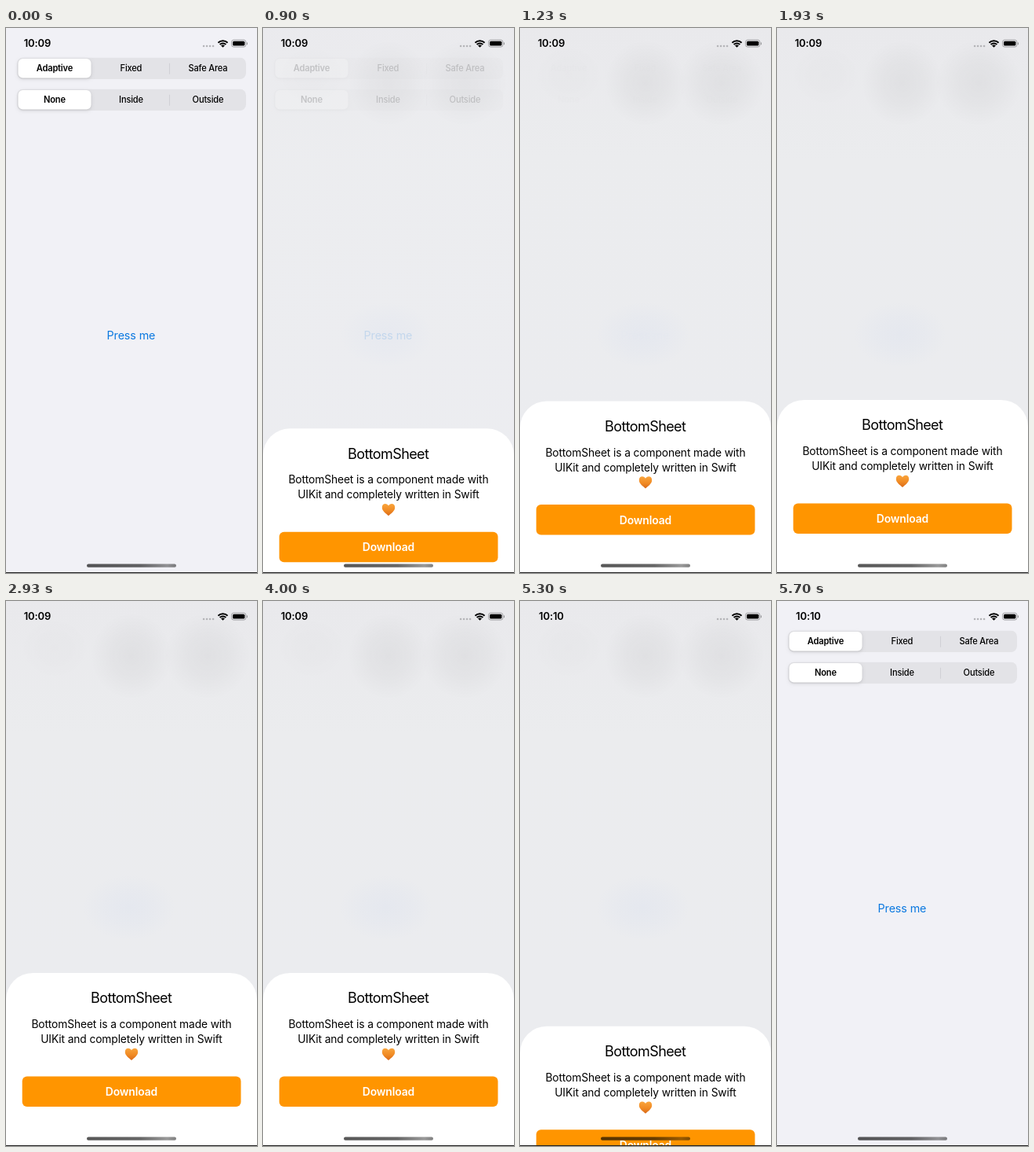
Write an HTML page with a canvas that moves like this. It is 320 px wide and 693 px high and loops after 5.77 s.

```html
<!DOCTYPE html>
<html lang="en">
<head>
<meta charset="utf-8">
<title>Bottom sheet</title>
<style>
html, body { margin: 0; width: 100%; height: 100%; overflow: hidden; background: #f1f1f6; }
canvas { display: block; width: 320px; height: 693px; }
</style>
</head>
<body>
<canvas id="stage"></canvas>
<script>
const W = 320, H = 693, LOOP = 5770;
const SHEET_TOP = 473, SHEET_H = H - SHEET_TOP;
const OPEN = 620, DRAG = 5057, RELEASE = 5300, GONE = 5640, MINUTE = 4500;

const canvas = document.getElementById('stage');
const ctx = canvas.getContext('2d');
const dpr = window.devicePixelRatio || 1;
canvas.width = Math.round(W * dpr);
canvas.height = Math.round(H * dpr);

const clamp = v => Math.max(0, Math.min(1, v));
const smooth = v => { v = clamp(v); return v * v * (3 - 2 * v); };

function text(str, x, y, size, weight, spacing, color) {
  ctx.font = `${weight} ${size}px Inter, Roboto, sans-serif`;
  ctx.letterSpacing = spacing + 'px';
  ctx.textAlign = 'center';
  ctx.fillStyle = color;
  ctx.fillText(str, x + spacing / 2, y);
}

function box(x, y, w, h, r, color) {
  ctx.beginPath();
  ctx.roundRect(x, y, w, h, r);
  ctx.fillStyle = color;
  ctx.fill();
}

function segments(y, labels) {
  box(14, y, 292, 27.3, 7.5, '#e3e3e7');
  ctx.save();
  ctx.shadowColor = 'rgba(0,0,0,.14)';
  ctx.shadowBlur = 4 * dpr;
  ctx.shadowOffsetY = 1.5 * dpr;
  box(15.5, y + 1.4, 93, 24.4, 6, '#fff');
  ctx.restore();
  box(208, y + 7, 1, 14, 0, '#d0d0d5');
  labels.forEach((s, i) =>
    text(s, [62, 159.5, 257.5][i], y + 17.4, 11.1, i ? 500 : 600, -0.2, '#000'));
}

function page(t) {
  ctx.fillStyle = '#f1f1f6';
  ctx.fillRect(0, 0, W, H);
  segments(37.7, ['Adaptive', 'Fixed', 'Safe Area']);
  segments(77.7, ['None', 'Inside', 'Outside']);
  const pressed = t >= 430 && t < 850;
  ctx.globalAlpha = pressed ? 0.25 + 0.75 * smooth((t - 600) / 250) : 1;
  text('Press me', 159.5, 396, 14.3, 400, -0.1, '#0a78e0');
  ctx.globalAlpha = 1;
}

function glow(x, y, rx, ry, rgb, alpha) {
  ctx.save();
  ctx.translate(x, y);
  ctx.scale(rx, ry);
  const g = ctx.createRadialGradient(0, 0, 0, 0, 0, 1);
  g.addColorStop(0, `rgba(${rgb},${alpha})`);
  g.addColorStop(0.5, `rgba(${rgb},${alpha * 0.6})`);
  g.addColorStop(1, `rgba(${rgb},0)`);
  ctx.fillStyle = g;
  ctx.fillRect(-1, -1, 2, 2);
  ctx.restore();
}

function backdrop(alpha) {
  if (alpha <= 0) return;
  ctx.globalAlpha = alpha;
  const g = ctx.createLinearGradient(0, 0, 0, 480);
  g.addColorStop(0, '#e9e9ec');
  g.addColorStop(0.35, '#ebecee');
  g.addColorStop(1, '#ebecef');
  ctx.fillStyle = g;
  ctx.fillRect(0, 0, W, H);
  glow(62, 60, 45, 40, '0,0,0', 0.012);
  glow(160, 70, 52, 55, '0,0,0', 0.045);
  glow(257, 70, 55, 55, '0,0,0', 0.045);
  glow(157, 390, 60, 42, '80,130,240', 0.04);
  ctx.globalAlpha = 1;
}

function heart(x, y) {
  ctx.save();
  ctx.translate(x, y);
  ctx.beginPath();
  ctx.moveTo(0, -4.8);
  ctx.bezierCurveTo(-1.6, -8.2, -8.2, -8.6, -8.2, -2.6);
  ctx.bezierCurveTo(-8.2, 2, -3, 5, 0, 8);
  ctx.bezierCurveTo(3, 5, 8.2, 2, 8.2, -2.6);
  ctx.bezierCurveTo(8.2, -8.6, 1.6, -8.2, 0, -4.8);
  const g = ctx.createLinearGradient(0, -7, 0, 8);
  g.addColorStop(0, '#f9a43c');
  g.addColorStop(0.55, '#f08a24');
  g.addColorStop(1, '#d9691a');
  ctx.fillStyle = g;
  ctx.fill();
  ctx.restore();
}

function sheet(top) {
  if (top >= H) return;
  ctx.save();
  ctx.translate(0, top);
  box(0, 0, W, H, [34, 34, 0, 0], '#fff');
  text('BottomSheet', 160, 38.3, 18, 400, -0.6, '#000');
  text('BottomSheet is a component made with', 160, 70, 13.8, 400, -0.12, '#000');
  text('UIKit and completely written in Swift', 160, 89, 13.8, 400, -0.12, '#000');
  heart(160, 103);
  box(20.7, 131.5, 278.8, 38.5, 6, '#ff9500');
  text('Download', 160, 156, 13.9, 600, -0.15, '#fff');
  ctx.restore();
}

function statusBar(t) {
  text(t < MINUTE ? '10:09' : '10:10', 40, 24.3, 13, 600, -0.1, '#000');
  for (let i = 0; i < 4; i++) box(250.8 + i * 4, 21.7, 2.6, 2.6, 1.3, '#b4b4b8');

  ctx.save();
  ctx.beginPath();
  ctx.moveTo(276.5, 24.8);
  ctx.arc(276.5, 24.8, 10, -Math.PI * 0.75, -Math.PI * 0.25);
  ctx.closePath();
  ctx.clip();
  ctx.strokeStyle = ctx.fillStyle = '#000';
  ctx.lineWidth = 2;
  for (const r of [8.6, 5.4]) {
    ctx.beginPath();
    ctx.arc(276.5, 24.8, r, 0, Math.PI * 2);
    ctx.stroke();
  }
  ctx.beginPath();
  ctx.arc(276.5, 24.8, 3.2, 0, Math.PI * 2);
  ctx.fill();
  ctx.restore();

  ctx.beginPath();
  ctx.roundRect(287.5, 15.2, 18.4, 8.9, 2.8);
  ctx.strokeStyle = '#9a9a9d';
  ctx.lineWidth = 0.9;
  ctx.stroke();
  box(289, 16.7, 15.4, 5.9, 1.5, '#000');
  box(306.9, 18.2, 1.1, 3, 0.6, '#9a9a9d');
}

function homeBar() {
  const g = ctx.createLinearGradient(103, 0, 217, 0);
  g.addColorStop(0, 'rgba(0,0,0,.66)');
  g.addColorStop(0.6, 'rgba(0,0,0,.6)');
  g.addColorStop(0.9, 'rgba(0,0,0,.4)');
  g.addColorStop(1, 'rgba(0,0,0,.5)');
  box(103, 681.6, 114, 4.2, 2.1, g);
  box(0, 692, W, 1, 0, '#222');
}

// Distance of the sheet below its resting place
function offset(t) {
  if (t < OPEN || t >= GONE) return SHEET_H;
  if (t < DRAG) {
    const k = (t - OPEN) * 0.01156;
    const d = SHEET_H * (1 + k) * Math.exp(-k);
    return d < 0.3 ? 0 : d;
  }
  if (t < RELEASE) return 0.001138 * (t - DRAG) ** 2;
  const u = (t - RELEASE) / (GONE - RELEASE);
  const from = 0.001138 * (RELEASE - DRAG) ** 2;
  const v = 0.002276 * (RELEASE - DRAG) * (GONE - RELEASE);
  return from + (SHEET_H - from) * smooth(u) + v * u * (1 - u) ** 2;
}

function frame(now) {
  const t = now % LOOP;
  const d = offset(t);
  const veil = t < DRAG ? 1 - d / SHEET_H : 1 - smooth((t - RELEASE - 30) / (GONE - RELEASE - 30));
  ctx.setTransform(dpr, 0, 0, dpr, 0, 0);
  page(t);
  backdrop(veil);
  sheet(SHEET_TOP + d);
  statusBar(t);
  homeBar();
}

const start = performance.now();
function tick() {
  frame(performance.now() - start);
  requestAnimationFrame(tick);
}
tick();
</script>
</body>
</html>
```
